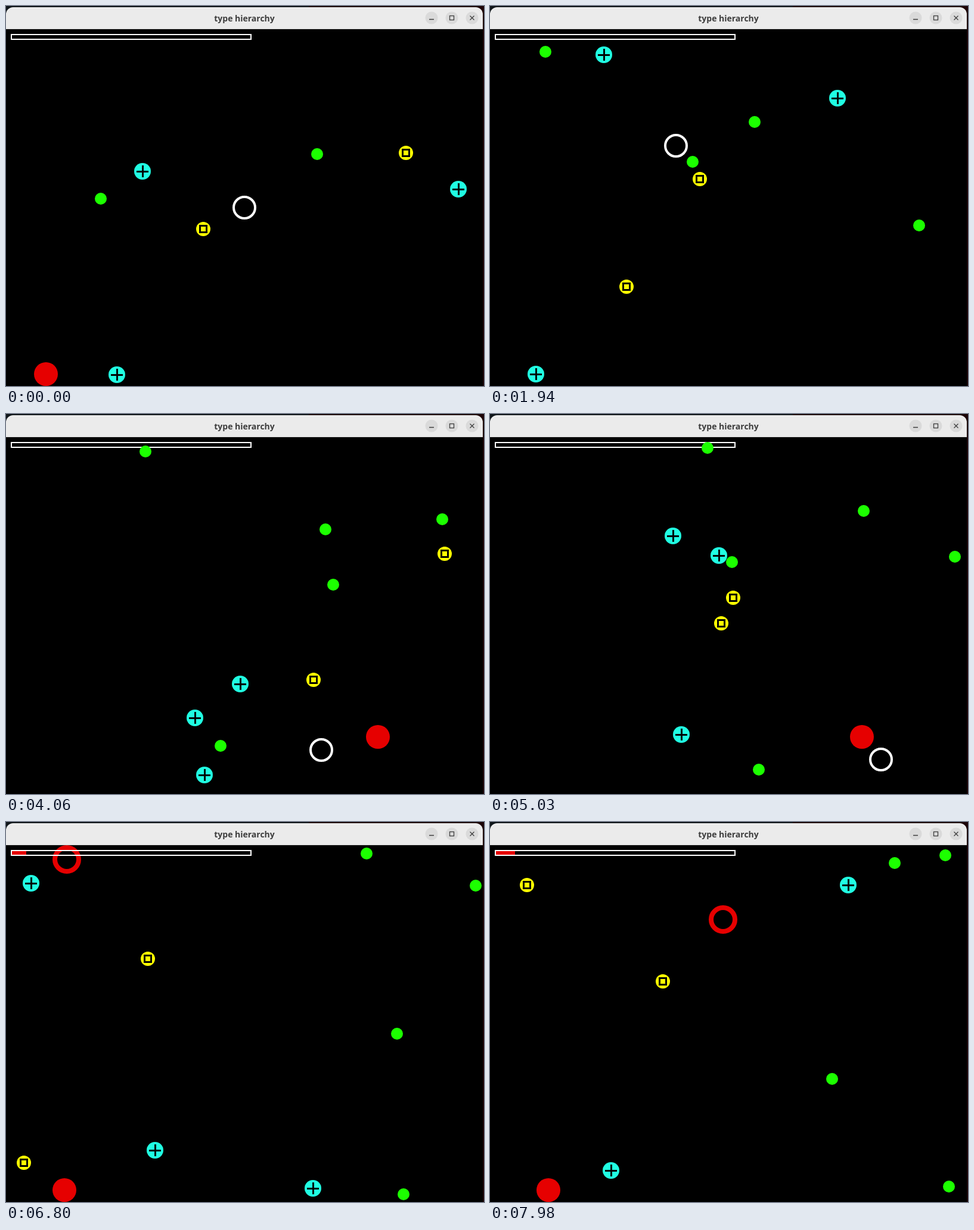
Animation, 802 px wide and 639 px high, one loop 8 s. Source, as an HTML page with a canvas:

```html
<!DOCTYPE html>
<html lang="en">
<head>
<meta charset="utf-8">
<title>type hierarchy</title>
<style>
  html, body { margin: 0; width: 100%; height: 100%; overflow: hidden; background: #000; }
  canvas { display: block; }
</style>
</head>
<body>
<canvas id="stage" width="802" height="639"></canvas>
<script>
const ctx = document.getElementById('stage').getContext('2d');
const LOOP = 8000, STEP = 33.52;
const FIELD = { left: 0, right: 800, top: 39, bottom: 639 };
const RED = '#e60000', WHITE = '#fff', INK = '#3d3d3d';

// Reflect a free-running coordinate between two walls.
function bounce(v, lo, hi) {
  const span = hi - lo, period = 2 * span;
  const u = (((v - lo) % period) + period) % period;
  return lo + (u > span ? period - u : u);
}

function disc(x, y, r, color) {
  ctx.fillStyle = color;
  ctx.beginPath();
  ctx.arc(x, y, r, 0, Math.PI * 2);
  ctx.fill();
}

function ring(x, y, r, width, color) {
  ctx.strokeStyle = color;
  ctx.lineWidth = width;
  ctx.beginPath();
  ctx.arc(x, y, r, 0, Math.PI * 2);
  ctx.stroke();
}

function lines(color, width, ...segments) {
  ctx.strokeStyle = color;
  ctx.lineWidth = width;
  ctx.beginPath();
  for (const [x0, y0, x1, y1] of segments) {
    ctx.moveTo(x0, y0);
    ctx.lineTo(x1, y1);
  }
  ctx.stroke();
}

const plain = { r: 10, color: '#1cff00', mark() {} };

const cross = {
  r: 14, color: '#20ffe2',
  mark(x, y) {
    ctx.fillStyle = '#000';
    ctx.fillRect(x - 10, y - 1, 20, 3);
    ctx.fillRect(x - 1, y - 10, 3, 20);
  }
};

const box = {
  r: 12, color: '#ffff00',
  mark(x, y) {
    ctx.strokeStyle = '#000';
    ctx.lineWidth = 3;
    ctx.strokeRect(x - 5.5, y - 5.5, 11, 11);
  }
};

// Free flight from a birth point; ay bends the path.
const fly = (x, y, vx, vy, ay = 0) => t => [x + vx * t, y + vy * t + ay * t * t / 2];

// Straight runs between key points, one for each of the last turns.
const TURNS = [0, 29, 87, 121, 150, 203, 238];
function roam(...points) {
  const times = TURNS.slice(-points.length);
  return n => {
    let i = 0;
    while (i < times.length - 2 && n >= times[i + 1]) i++;
    const k = (n - times[i]) / (times[i + 1] - times[i]);
    return points[i].map((v, axis) => v + (points[i + 1][axis] - v) * k);
  };
}

const balls = [];
const ball = (type, move, from = 0, to = Infinity) => balls.push({ type, move, from, to });

ball(plain, fly(159, 324, 3.117, -1.071));
ball(plain, fly(522, 249, -1.34, -6.05, 0.0032), 0, 135);
ball(plain, fly(508, 426, 4.931, -1.314), 15, 190);
ball(plain, fly(10, 110, 2.5, -1), 25, 60);
ball(plain, fly(80, 75, 4.53, -0.4, 0.0036), 87);
ball(plain, fly(695, 142, 2.34, 2.18), 105);
ball(plain, fly(390, 590, 4.08, 0.53), 135);

ball(cross, fly(229, 278, -0.66, -4.38), 0, 87);
ball(cross, fly(186, 620, -4.06, 0.07, -0.0029), 0, 135);
ball(cross, fly(759, 308, -3.03, -5.36, -0.0274), 0, 100);
ball(cross, fly(455, 634, -2.97, -8.59), 100, 190);
ball(cross, fly(341, 543.7, -1.34, -0.44, 0.0165), 135);
ball(cross, fly(55, 120, -1, -1.3), 190, 210);

// Roaming paths run on the loop's own steps; heights past a wall fold back.
const roamer = (type, from, ...points) => {
  const path = roam(...points);
  ball(type, t => path(t + from), from);
};
roamer(cross, 60, [235, 53], [317, 511], [384, 1012], [515, 1760], [601, 2288]);
roamer(box, 0, [331, 375], [471, 375], [233, 207], [736, 235], [408, 309], [238, 230], [62, 106]);
roamer(box, 0, [671, 247], [246, 621], [211, 323], [516, 447], [388, 352], [30, 573], [290, 268]);

const player = roam([400, 339], [250, 189], [373, 281], [529, 565], [656, 581], [102, 63], [391, 164]);
const POWERED = 152;

function drawBall({ type, move, from, to }, n) {
  if (n < from || n >= to) return;
  const { r, color, mark } = type;
  const [px, py] = move(n - from);
  const x = Math.round(bounce(px, FIELD.left + r, FIELD.right - r));
  const y = Math.round(bounce(py, FIELD.top + r, FIELD.bottom - r));
  disc(x, y, r, color);
  mark(x, y);
}

function drawPowerUp(n) {
  if (n < 15) disc(67, 619, 20, RED);
  else if (n >= 70 && n < POWERED) disc(624, 543, 20, RED);
  else if (n >= 175) disc(98, 619, 20, RED);
}

function drawPlayer(n) {
  const [x, y] = player(n).map(Math.round);
  if (n < POWERED) ring(x, y, 18, 4, WHITE);
  else ring(x, y, 20, 8, RED);
}

function drawMeter(n) {
  const hits = Math.min(4, Math.max(0, Math.floor((n - 155) / 14)));
  ctx.fillStyle = RED;
  ctx.fillRect(10, 49, hits * 8, 6);
  ctx.strokeStyle = WHITE;
  ctx.lineWidth = 2;
  ctx.strokeRect(9, 48, 402, 8);
}

function drawTitleBar() {
  ctx.fillStyle = '#10161a';
  ctx.fillRect(0, 0, 508, 39);
  ctx.fillStyle = '#1c0508';
  ctx.fillRect(508, 0, 294, 39);
  ctx.fillRect(800, 39, 2, 600);

  ctx.fillStyle = '#ebebeb';
  ctx.beginPath();
  ctx.roundRect(0, 2, 800, 37, [12, 12, 0, 0]);
  ctx.fill();
  ctx.fillStyle = '#d2d2d2';
  ctx.fillRect(0, 38, 800, 1);

  ctx.fillStyle = INK;
  ctx.font = 'bold 14px "Open Sans", "Noto Sans", sans-serif';
  ctx.textAlign = 'center';
  ctx.fillText('type hierarchy', 400, 26);

  for (const x of [714, 748, 782]) disc(x, 20, 10.5, '#dadada');
  lines(INK, 1.3, [710, 22.5, 718, 22.5], [778.5, 16.5, 785.5, 23.5], [785.5, 16.5, 778.5, 23.5]);
  ctx.strokeRect(744.5, 16.5, 7, 7);
}

function draw(n) {
  ctx.fillStyle = '#000';
  ctx.fillRect(0, 0, 802, 639);
  drawPowerUp(n);
  drawPlayer(n);
  drawMeter(n);
  for (const b of balls) drawBall(b, n);
  drawTitleBar();
}

function tick() {
  draw(Math.floor((performance.now() % LOOP + 5) / STEP));
  requestAnimationFrame(tick);
}
tick();
</script>
</body>
</html>
```
